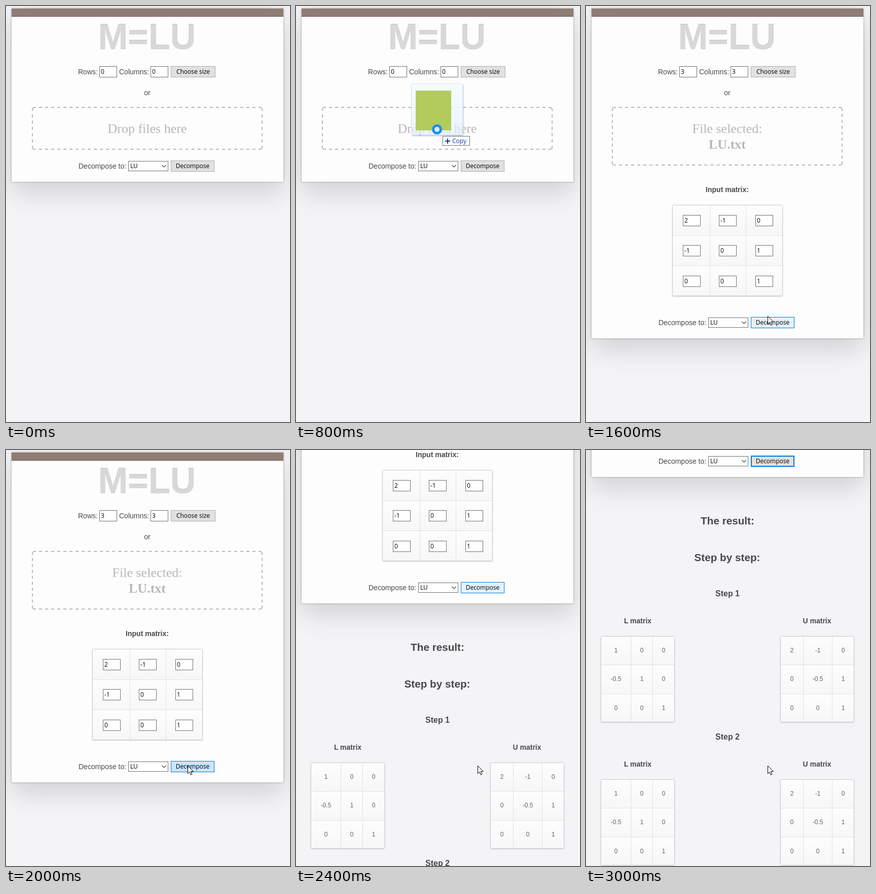
Recreate the animation shown at these times as an HTML page. Size 560x816 px, loop 3.2 s.

```html
<!DOCTYPE html>
<html lang="en">
<head>
<meta charset="utf-8">
<title>M=LU</title>
<style>
html, body { margin: 0; width: 100%; height: 100%; overflow: hidden; background: #f4f3f6; }
#stage { position: relative; width: 560px; height: 816px; overflow: hidden; background: #f4f3f6; }
#stage div, #stage svg { position: absolute; box-sizing: border-box; }
#page, #foot, #results, #empty, #loaded, #drag, #cursor { left: 0; top: 0; }
.text { white-space: pre; font: 14px/40px "Liberation Sans", Arial, sans-serif; color: #4a474c; }
.mid { transform: translateX(-50%); }
.bold { font-weight: bold; }
.serif { font-family: "Liberation Serif", "Times New Roman", serif; font-size: 26px; color: #b9b7b9; }
.ui { font-family: "Open Sans", "Noto Sans", sans-serif; font-size: 12px; color: #000; }
.title { font-size: 70px; font-weight: bold; color: #d6d9d6; text-shadow: 0 -1px 0 #bfc2bf; }
.h2 { font-size: 20.7px; font-weight: bold; }
.h3 { font-size: 16px; font-weight: bold; }
.num { font-size: 12px; color: #646266; }
.card { background: #fefdfe; box-shadow: 0 0 3px rgba(0,0,0,.4), 0 20px 50px rgba(0,0,0,.15); }
.bar { background: #8f7d75; border-bottom: 1px solid #685952; }
.field { background: #fff; border: 1px solid #707070; }
.button { background: #e1e1e1; border: 1px solid #adadad; }
.button.hover { background: #e5f1fb; border-color: #0078d7; }
.button.press { background: #cce4f7; border-color: #0078d7; }
.button.focus { border: 2px solid #0078d7; }
.table { border: 1px solid #cbcacc; border-radius: 3px; background: #fafafa; box-shadow: 0 1px 2px #cfced1; }
.cell { background: linear-gradient(#fdfdfd, #f7f7f8); border: 0 solid #e0e0e1; }
.tile { border: 1px solid rgba(205,226,240,.8); border-radius: 2px;
  background: linear-gradient(rgba(246,251,254,.95), rgba(222,241,252,.65)); box-shadow: 1px 2px 3px rgba(80,100,120,.35); }
.badge { background: #b3cb5c; }
.ring { border: 5px solid #1c8ff0; border-radius: 50%; background: #d8ecfb; }
.plus { background: #0a3c9c; }
.zone { fill: none; stroke: #b9b7b9; stroke-width: 2; }
</style>
</head>
<body>
<div id="stage">
  <div id="page">
    <div id="main"></div>
    <div id="empty"></div>
    <div id="loaded"></div>
    <div id="foot"></div>
    <div id="results"></div>
  </div>
  <div id="drag"></div>
  <svg id="cursor" width="14" height="21" viewBox="-1 -1 14 21">
    <path d="M.5 .5V15.8L4 12.5L6.4 18.2L8.8 17.2L6.4 11.6H11.4Z" fill="#fff" stroke="#000"/>
  </svg>
</div>
<script>
const $ = id => document.getElementById(id);
const page = $("page"), main = $("main"), empty = $("empty"), loaded = $("loaded"),
  foot = $("foot"), results = $("results"), drag = $("drag"), cursor = $("cursor");

function box(parent, cls, x, y, w, h) {
  const el = document.createElement("div");
  el.className = cls;
  Object.assign(el.style, { left: x + "px", top: y + "px" });
  if (w) Object.assign(el.style, { width: w + "px", height: h + "px" });
  parent.append(el);
  return el;
}

// y is the vertical middle of the line
function text(parent, str, x, y, cls = "") {
  const el = box(parent, "text " + cls, x, y - 20);
  el.textContent = str;
  return el;
}

function field(parent, x, y, value) {
  box(parent, "field", x, y, 35, 22);
  return text(parent, value, x + 3, y + 11, "ui");
}

function button(parent, x, y, w, label) {
  const el = box(parent, "button", x, y, w, 22);
  text(parent, label, x + w / 2, y + 11, "ui mid");
  return el;
}

// each side starts and ends with half a dash, so the corners stay solid
function dropZone(parent, h) {
  const right = 454, bottom = h - 1, r = 4;
  const side = (d, length) => {
    const dash = length / Math.round(length / 12) / 2;
    return `<path class="zone" d="${d}" stroke-dasharray="${dash}" stroke-dashoffset="${dash / 2}"/>`;
  };
  const w = right - 1 - 2 * r, v = bottom - 1 - 2 * r, arc = `a${r} ${r} 0 0 1 `;
  parent.insertAdjacentHTML("beforeend",
    `<svg style="left:51px;top:198px" width="456" height="${h}">
      ${side(`M5 1h${w}`, w)}${side(`M5 ${bottom}h${w}`, w)}
      ${side(`M1 5v${v}`, v)}${side(`M${right} 5v${v}`, v)}
      <path class="zone" d="M1 5${arc}4 -4m${w} 0${arc}4 4m0 ${v}${arc}-4 4m${-w} 0${arc}-4 -4"/></svg>`);
}

function table(parent, x, y, cols, rowH, rows, put) {
  const width = cols.reduce((a, b) => a + b);
  box(parent, "table", x, y, width + 1, Math.floor(rowH * 3 + 1));
  rows.forEach((row, r) => {
    let cx = x;
    row.forEach((value, c) => {
      const top = Math.round(y + r * rowH), bottom = Math.floor(y + (r + 1) * rowH);
      const cell = box(parent, "cell", cx + (c ? 0 : 1), top + (r ? 0 : 1),
        cols[c] - (c ? 0 : 1), bottom - top - (r ? 0 : 1));
      cell.style.borderLeftWidth = c ? "1px" : 0;
      cell.style.borderTopWidth = r ? "1px" : 0;
      put(value, cx + cols[c] / 2, y + (r + .5) * rowH, c);
      cx += cols[c];
    });
  });
}

const card = box(main, "card", 11, 5, 536, 340);
box(main, "bar", 11, 5, 536, 16);
text(main, "M=LU", 278, 61, "title mid");
text(main, "Rows:", 142, 129);
text(main, "Columns:", 223, 129);
const counts = [field(main, 184, 118, "0"), field(main, 285, 118, "0")];
button(main, 325, 118, 88, "Choose size");
text(main, "or", 278.5, 170, "mid");

dropZone(empty, 84);
text(empty, "Drop files here", 278.5, 241, "serif mid");

dropZone(loaded, 115);
text(loaded, "File selected:", 278.5, 241, "serif mid");
text(loaded, "LU.txt", 278.5, 272, "serif bold mid");
text(loaded, "Input matrix:", 278.5, 360, "bold mid");
table(loaded, 170, 390, [74, 71, 72], 59.5, [[2, -1, 0], [-1, 0, 1], [0, 0, 1]],
  (v, x, y, c) => field(loaded, Math.round(190.5 + 71.5 * c), Math.round(y - 10), v));

text(foot, "Decompose to:", 143, 314);
box(foot, "field", 241, 304, 79, 20);
text(foot, "LU", 245, 314, "ui");
foot.insertAdjacentHTML("beforeend",
  `<svg style="left:306px;top:310px" width="11" height="9"><path d="M1.5 2L5.5 6L9.5 2" fill="none" stroke="#444" stroke-width="1.2"/></svg>`);
const decompose = button(foot, 325, 303, 86, "Decompose");

text(results, "The result:", 279, 738, "h2 mid");
text(results, "Step by step:", 278.5, 810, "h2 mid");
const lower = [[1, 0, 0], [-0.5, 1, 0], [0, 0, 1]];
const upper = [[2, -1, 0], [0, -0.5, 1], [0, 0, 1]];
const number = (v, x, y) => text(results, v, x + .5, Math.round(y), "num mid");
[1, 2].forEach((n, i) => {
  const y = 881 + i * 281;
  text(results, "Step " + n, 279, y, "h3 mid");
  text(results, "L matrix", 102, y + 53, "bold mid");
  text(results, "U matrix", 455.5, y + 53, "bold mid");
  table(results, 29, y + 83, [59, 43, 43], 56.3, lower, number);
  table(results, 383, y + 83, [45, 57, 43], 56.3, upper, number);
});

box(drag, "tile", 227, 152, 102, 101);
box(drag, "badge", 236, 166, 70, 78);
box(drag, "ring", 268, 232, 20, 20);
box(drag, "field", 289, 255, 54, 19);
box(drag, "plus", 294, 264, 10, 2);
box(drag, "plus", 298, 260, 2, 10);
text(drag, "Copy", 308, 265, "ui").style.color = "#0a3c9c";

// drag: offset of the dragged file; cur: pointer tip
const steps = [
  { at: 0 },
  { at: 400, drag: [138, -159] },
  { at: 600, drag: [16, -12] },
  { at: 800, drag: [0, 0] },
  { at: 1000, cur: [363, 313] },
  { at: 1200, cur: [409, 405] },
  { at: 1400, cur: [359, 607] },
  { at: 1600, cur: [358, 608], state: "hover" },
  { at: 1800, cur: [358, 619], state: "hover" },
  { at: 2000, cur: [358, 619], state: "press" },
  { at: 2200, cur: [358, 619], state: "hover", scroll: 99 },
  { at: 2400, cur: [358, 619], state: "hover", scroll: 351 },
  { at: 2600, cur: [358, 619], state: "hover", scroll: 577 },
  { at: 2800, cur: [358, 619], state: "hover", scroll: 599 },
  { at: 3000, cur: [358, 619], state: "focus", scroll: 599 }
];
const LOOP = 3200;
const show = (el, on) => { el.style.display = on ? "block" : "none"; };
const move = (el, x, y) => { el.style.transform = `translate(${x}px, ${y}px)`; };

let current;
function draw(step) {
  const filled = step.at >= 1000;
  show(empty, !filled);
  show(loaded, filled);
  show(results, step.scroll);
  show(drag, step.drag);
  show(cursor, step.cur);
  if (step.drag) move(drag, ...step.drag);
  if (step.cur) move(cursor, step.cur[0] - 1, step.cur[1] - 1);
  move(page, 0, -(step.scroll || 0));
  move(foot, 0, filled ? 307 : 0);
  card.style.height = (filled ? 647 : 340) + "px";
  counts.forEach(el => { el.textContent = filled ? "3" : "0"; });
  decompose.className = "button " + (step.state || "");
}

function tick() {
  const t = performance.now() % LOOP;
  const step = steps.filter(s => s.at <= t).pop();
  if (step !== current) draw(current = step);
  requestAnimationFrame(tick);
}
tick();
</script>
</body>
</html>
```
